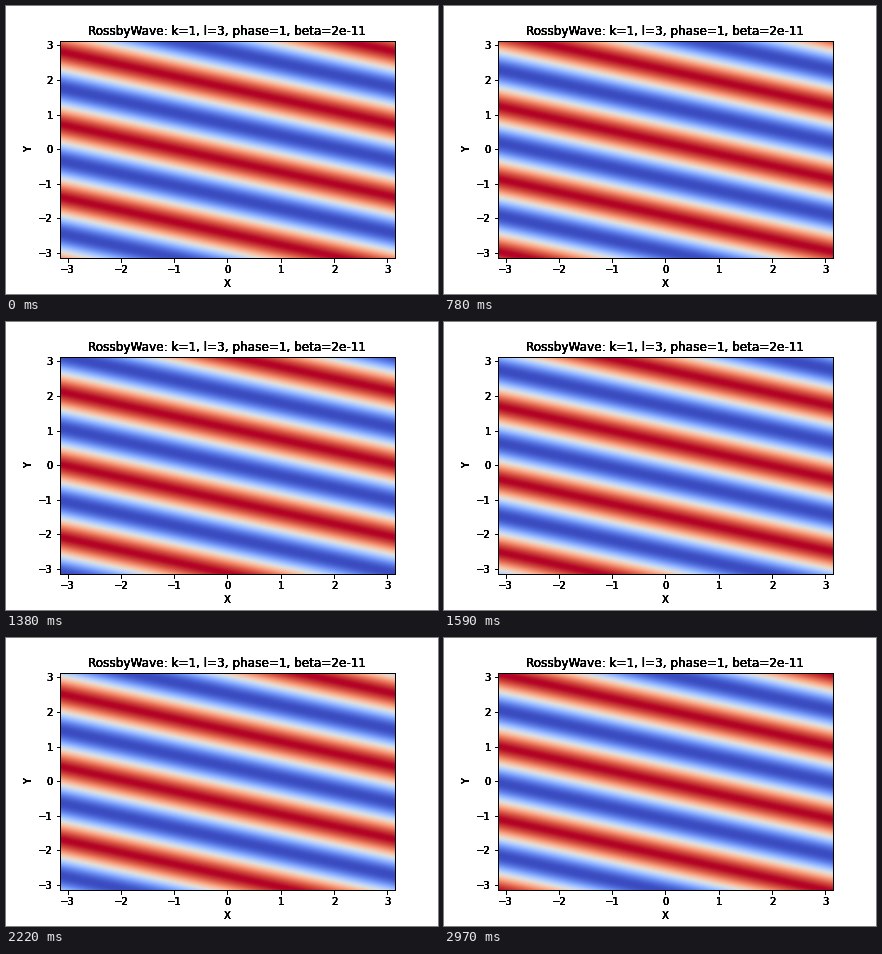
Animation of 432x288 px, one loop 3000 ms. Source, as a matplotlib script:

```python
import numpy as np
import matplotlib.pyplot as plt
from matplotlib.animation import FuncAnimation

K, L, PHASE, BETA = 1, 3, 1, 2e-11
FRAMES, INTERVAL = 100, 30
TOTAL_SHIFT = 18.0      # phase travelled from first to last frame, radians
LAYERS = 6              # stacked axes give the heavy, hard-edged lettering

plt.rcParams["font.family"] = "DejaVu Sans"
plt.rcParams["toolbar"] = "None"

fig = plt.figure(figsize=(6, 4), dpi=72, facecolor="white")


def add_axes(zorder):
    ax = fig.add_axes([0.125, 0.125, 0.775, 0.755], zorder=zorder)
    ax.patch.set_visible(False)
    ax.set(xlim=(-np.pi, np.pi), ylim=(-np.pi, np.pi),
           xticks=range(-3, 4), yticks=range(-3, 4),
           xlabel="X", ylabel="Y")
    ax.set_title(f"RossbyWave: k={K}, l={L}, phase={PHASE}, beta={BETA:.0e}")
    return ax


def centers(n):
    return (np.arange(n) + 0.5) / n * 2 * np.pi - np.pi


layers = [add_axes(z) for z in range(LAYERS)]
x, y = np.meshgrid(centers(335), centers(217))


def wave(i):
    shift = TOTAL_SHIFT * i / (FRAMES - 1)
    return np.cos(K * x + L * y + shift + PHASE)


image = layers[0].imshow(wave(0), cmap="coolwarm", vmin=-1, vmax=1,
                         origin="lower", aspect="auto",
                         extent=(-np.pi, np.pi, -np.pi, np.pi))


def update(i):
    image.set_data(wave(i))
    return [image]


anim = FuncAnimation(fig, update, frames=FRAMES, interval=INTERVAL,
                     repeat=True, repeat_delay=0, blit=False)
plt.show()
```
